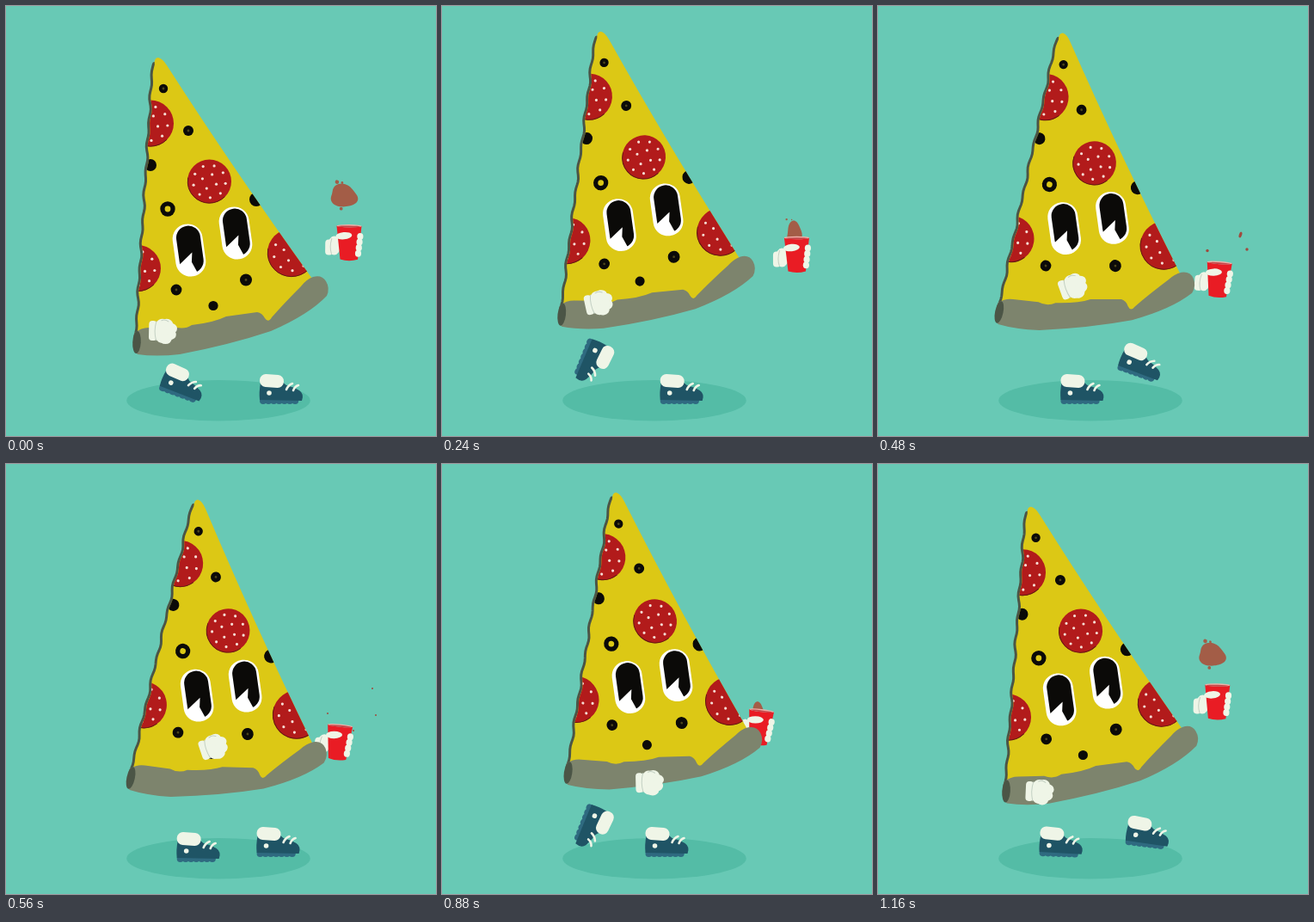
An HTML page with a canvas for the animation above (1.2 s loop, 500 by 500 pixels).

```html
<!DOCTYPE html>
<html lang="en">
<head>
<meta charset="utf-8">
<title>Walking pizza</title>
<style>
html, body { margin: 0; height: 100%; overflow: hidden; background: #68c9b5; }
canvas { display: block; width: 100vw; height: 100vh; }
</style>
</head>
<body>
<canvas id="stage" width="500" height="500"></canvas>
<script>
const ctx = document.getElementById('stage').getContext('2d');
const LOOP = 1200, STEP = 40, TAU = Math.PI * 2;
const C = {
  bg: '#68c9b5', shadow: '#54bca6', cheese: '#dcc815', crust: '#7d846d', edge: '#4b5546',
  meat: '#b21b1b', meatEdge: '#641712', ink: '#0b0a08', white: '#eff5e7', line: '#c3d0c3',
  cup: '#e91c24', rim: '#eeb0a8', cola: '#a35d47', splash: '#a04a3e', shoe: '#1f5465', sole: '#2f6a80'
};

// Height of the slice over one loop: time, y.
const BOB = [[0, 324], [340, 288], [630, 317], [880, 302], [1000, 287], [1160, 314]];
// One foot leaving the ground and landing again: time, x, y, degrees.
const SWING = [
  [620, 213, 447, 2], [660, 206, 446, 20], [720, 198, 443, 27],
  [890, 175, 422, 112], [1060, 254, 398, 97], [1160, 314, 430, 7], [1200, 320, 447, 0]
];

const wave = (t, deg) => Math.cos(t / LOOP * TAU - deg * TAU / 360);
const wrap = t => (t % LOOP + LOOP) % LOOP;

// Cyclic monotone cubic interpolation.
function track(rows, t) {
  const n = rows.length;
  const row = k => rows[(k + n) % n];
  const time = k => row(k)[0] + LOOP * Math.floor(k / n);
  let i = n - 1;
  while (rows[i][0] > t) i--;
  const h = time(i + 1) - time(i), s = (t - time(i)) / h, u = 1 - s;
  const slope = (k, j) => (row(k + 1)[j] - row(k)[j]) / (time(k + 1) - time(k));
  const tangent = (k, j) => {
    const a = slope(k - 1, j), b = slope(k, j);
    return a * b > 0 ? 2 * a * b / (a + b) : 0;
  };
  return row(i).slice(1).map((p, k) => {
    const j = k + 1;
    return p * (1 + 2 * s) * u * u + row(i + 1)[j] * s * s * (3 - 2 * s)
      + h * s * u * (u * tangent(i, j) - s * tangent(i + 1, j));
  });
}

// Three points that carry the slice: near the tip, lower left, lower right.
function bodyPose(t) {
  const lean = wave(t, 12), [y] = track(BOB, t);
  const x = 235.3 - 4.3 * wave(t, 45) + .3 * (y - 305), dy = 2.5 + 3.5 * lean;
  return [[197 - 22 * lean + 7 * lean * lean, y - 231.5 + 3.5 * lean], [x - 40.3, y + dy], [x + 40.3, y - dy]];
}
const handPose = t => [215 - 40 * wave(t, 36), 355 + 29 * wave(t, 322), -8 + 12 * wave(t, 320)];
const cupPose = t => [390.5 + 22 * wave(t, 68), 300.5 + 25 * wave(t, 188), 3.5 - 4 * wave(t, 46)];
const footPose = t => t < 620 ? [320 - .172 * t, 447, 0] : track(SWING, t);

function oval(x, y, rx, ry, color, deg = 0) {
  ctx.fillStyle = color;
  ctx.beginPath();
  ctx.ellipse(x, y, rx, ry, deg * TAU / 360, 0, TAU);
  ctx.fill();
}
function fill(d, color) {
  ctx.fillStyle = color;
  ctx.fill(new Path2D(d));
}
function stroke(d, color, width) {
  ctx.strokeStyle = color;
  ctx.lineWidth = width;
  ctx.stroke(new Path2D(d));
}
function pill(x, y, w, h, color, r = Math.min(w, h) / 2) {
  ctx.fillStyle = color;
  ctx.beginPath();
  ctx.roundRect(x - w / 2, y - h / 2, w, h, r);
  ctx.fill();
}
function placed([x, y, deg], draw) {
  ctx.save();
  ctx.translate(x, y);
  ctx.rotate(deg * TAU / 360);
  draw();
  ctx.restore();
}

function shoe() {
  for (let x = -21; x <= 22; x += 6.2) oval(x, 12, 4, 4, C.sole);
  fill('M-24-9Q-26 2-25 11L24 12Q27 4 21 0Q14-4 6-6L0-11Z', C.shoe);
  placed([-11, -11, 4], () => pill(0, 0, 28, 15, C.white, 7));
  stroke('M6-1Q8-6 13-8M14 0Q16-5 20-6', C.white, 2.6);
  oval(-14, 3, 2.8, 2.8, C.white);
}

function fist() {
  pill(-12, 0, 9, 23, C.white, 4);
  oval(-1, 0, 10, 14, C.white);
  for (const [x, y] of [[4, -8], [9, -3], [8, 4], [3, 9]]) oval(x, y, 7.3, 6.2, C.white);
  stroke('M-8-11Q-11 0-8 11M-2-12Q2-14 6-11', C.line, 1);
}

function cup() {
  pill(-23, 5, 9, 18, C.white, 4);
  oval(-17, 3, 7.5, 11, C.white);
  stroke('M-20-5Q-23 5-20 13', C.line, 1);
  fill('M-14.5-20L14.5-20L10.5 19Q0 22-10 19Z', C.cup);
  oval(0, -20, 14.5, 1.7, C.rim);
  oval(0, -19.3, 13, 1, '#c4474a');
  oval(-6, -8.5, 9.5, 4.2, C.white, -6);
  for (let k = 0; k < 4; k++) oval(13 - k * .7, -8 + k * 6.6, 3.6, 4, C.white);
}

function pepperoni([x, y, r]) {
  oval(x, y, r, r, C.meat);
  ctx.strokeStyle = C.meatEdge;
  ctx.lineWidth = 1;
  ctx.beginPath();
  ctx.arc(x, y, r - .3, .8, 3.3);
  ctx.stroke();
  for (let k = 0; k < 13; k++) {
    const inner = k < 4, a = TAU * (inner ? k / 4 + .06 : (k - 4) / 9 + .02);
    const d = r * (inner ? .34 : .74);
    oval(x + d * Math.cos(a), y + d * Math.sin(a), 1.6, 1.6, '#f6dcd4');
  }
}
function olive([x, y, r, hole = 1.4, color = '#4c451a']) {
  oval(x, y, r, r, C.ink);
  oval(x, y, hole, hole, color);
}
function eye() {
  pill(0, 0, 35, 61, '#fff', 17);
  pill(1, -1, 28, 55, C.ink, 14);
  fill('M-13.5 15L3 3L1 14L6 27Q1 30-4 28Q-13 25-13.5 15Z', '#fff');
}

// The wavy left side, from the crust up to the tip.
let left = '';
for (let y = 384; y >= 68; y -= 4)
  left += `L${172 - (y - 66) * .062 + .9 * Math.sin(y / 4.5) + .5 * Math.sin(y / 9)} ${y}`;
const LEFT = new Path2D('M' + left.slice(1));
const SLICE = new Path2D('M152 386' + left + 'Q172 60 177 60Q182 61 187 69Q264 189 356 317L340 345L300 375Z');
const CRUST = 'M149.5 380Q157 374 166 374L196 373Q207 377 216 371Q242 368 256 361L292 356'
  + 'Q298 357 301 363Q305 369 309 362Q324 345 343 326Q349 318 357 315Q367 312 372 320'
  + 'Q377 328 373 337Q352 359 308 378Q260 394 202 405Q174 408 153 405Q146 399 149.5 380Z';
const MEAT = [[168, 136.5, 27], [236.5, 204, 25.5], [153, 305, 27], [332, 287, 28]];
const OLIVES = [
  [183, 96, 5.2], [212, 145, 6], [168, 185, 7, 0], [188, 236, 8.7, 3.4, C.cheese],
  [291, 225, 8, 0], [198, 330, 6.4], [279, 318.5, 7], [241, 348.5, 5.6, 0]
];
const REST = bodyPose(0);

// Matrix that carries the rest points to the pose.
function carry(pose) {
  const side = (p, k) => [p[k][0] - p[0][0], p[k][1] - p[0][1]];
  const matrix = p => {
    const [a, b] = side(p, 1), [c, d] = side(p, 2);
    return new DOMMatrix([a, b, c, d, ...p[0]]);
  };
  return matrix(pose).multiply(matrix(REST).inverse());
}

function slice(pose) {
  const m = carry(pose);
  ctx.save();
  ctx.transform(m.a, m.b, m.c, m.d, m.e, m.f);
  ctx.strokeStyle = C.edge;
  ctx.lineWidth = 6;
  ctx.stroke(LEFT);
  ctx.fillStyle = C.cheese;
  ctx.fill(SLICE);
  ctx.save();
  ctx.clip(SLICE);
  MEAT.forEach(pepperoni);
  OLIVES.forEach(olive);
  ctx.restore();
  fill(CRUST, C.crust);
  oval(152, 391, 4.8, 13, C.edge, 3);
  ctx.restore();

  for (const spot of [[213, 284], [267, 264]]) {
    const { x, y } = m.transformPoint(new DOMPoint(...spot));
    placed([x, y, -8], eye);
  }
}

// The drink is tossed out of the cup, hangs and drops back in.
function toss(t, [x, y]) {
  const age = wrap(t - 820) / 360 - 1, k = 1 - age * age;
  if (age >= 1) return;
  const rx = 7 + 10 * k * k, ry = 14 - 2 * k;
  placed([x - 6 * k, y + 3 - 58 * k, 8 * k], () => {
    ctx.fillStyle = C.cola;
    ctx.beginPath();
    for (let a = 0; a < TAU; a += .1) {
      const r = 1 + .1 * Math.sin(2 * a + 5) + .09 * Math.sin(3 * a + 1);
      ctx.lineTo(rx * r * Math.cos(a), ry * r * Math.sin(a));
    }
    ctx.fill();
    const size = Math.min(1, Math.max(0, k * 4 - 1.4));
    for (const [dx, dy, r] of [[-10, -1, 2.3], [-4, -1, 1.4], [-1, 1, 1.9]])
      oval(dx, dy * (ry + 3), r * size, r * size, C.cola);
  });
}

function splash(t) {
  const s = (t - 400) / 160;
  if (s < -.25 || s > 1.1) return;
  const size = 2.4 - 1.4 * s;
  for (const [x, y, dx, dy] of [[428, 274, 2, 18], [392, 279, -18, 11], [408, 290, -4, 20]])
    oval(x + dx * s, y + dy * s, size, size, C.splash);
  oval(417 + 9 * s, 271 - 10 * s, size, 6 - 5 * s, C.splash, 18);
}

function draw(t) {
  ctx.fillStyle = C.bg;
  ctx.fillRect(0, 0, 500, 500);
  ctx.lineCap = ctx.lineJoin = 'round';
  const grip = cupPose(t), [bx, by, turn] = footPose(wrap(t - 540));
  oval(247, 458.7, 106.8, 23.7, C.shadow);
  placed([bx, by - 6, turn], shoe);
  placed(footPose(t), shoe);
  toss(t, grip);
  splash(t);
  placed(grip, cup);
  slice(bodyPose(t));
  placed(handPose(t), fist);
}

function tick() {
  draw(Math.floor(performance.now() % LOOP / STEP) * STEP);
  requestAnimationFrame(tick);
}
tick();
</script>
</body>
</html>
```
